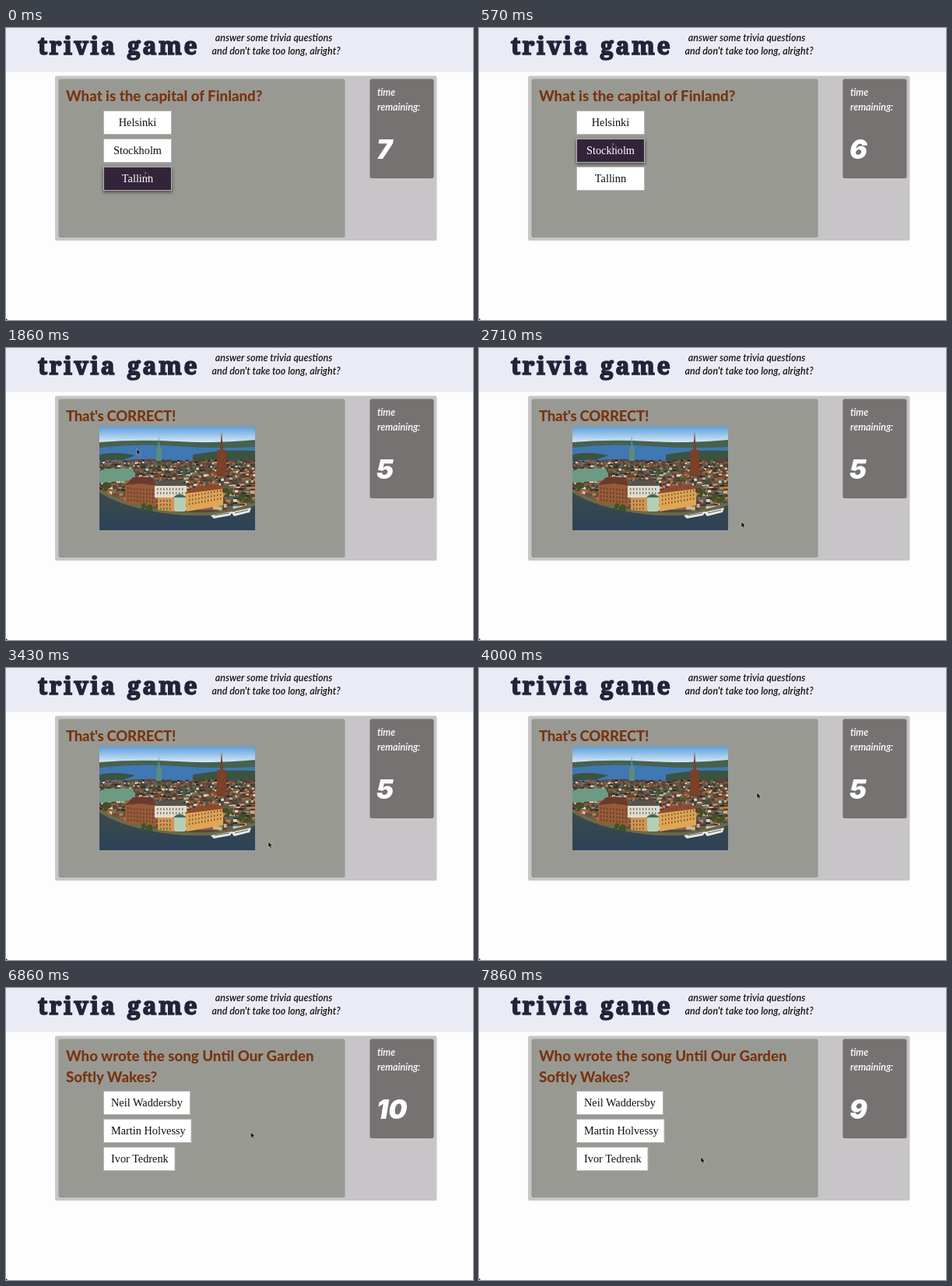
Write an HTML page that moves like this. It is 600x375 px and loops after 8000 ms.

```html
<!DOCTYPE html>
<html lang="en">
<head>
<meta charset="utf-8">
<title>trivia game</title>
<style>
html, body { margin: 0; width: 100%; height: 100%; overflow: hidden; background: #fefdfe; }
svg { display: block; width: 600px; height: 375px; }

.title { font: 900 30px "Noto Serif", serif; letter-spacing: 2.7px; fill: #23233b; stroke: #23233b; stroke-width: 1.7; }
.script { font: italic 600 12.5px Lato, sans-serif; fill: #161616; }
.side { fill: #fff; }
.question { font: 800 18.7px Lato, sans-serif; fill: #78340f; }
.answer { font: 14.3px "Liberation Serif", serif; }
.count { font: italic 900 34px Inter, sans-serif; fill: #fff; }

/* One tick of the 7 fps timeline is 1.7857% of the loop. */
.anim { animation: 8s step-end -5ms infinite; }

.option { fill: #fff; color: #111; stroke: none; }
.option rect { stroke: #b4b4b2; }
.option text { fill: currentColor; }

.ask { animation-name: ask; }
.correct { animation-name: correct; }
.next { animation-name: next; }
.first { animation-name: first; }
.second { animation-name: second; }
.third { animation-name: third; }
.ring { animation-name: ring; }
.reel { animation-name: reel; }
.cursor { animation-name: move; }

@keyframes ask { 0% { opacity: 1 } 19.643%, 100% { opacity: 0 } }
@keyframes correct { 0% { opacity: 0 } 19.643% { opacity: 1 } 82.143%, 100% { opacity: 0 } }
@keyframes next { 0% { opacity: 0 } 82.143%, 100% { opacity: 1 } }
@keyframes ring { 0% { opacity: 0 } 16.071%, 100% { opacity: 1 } }

@keyframes first {
  0% { fill: #fff; color: #111; filter: none }
  10.714%, 100% { fill: #34243a; color: #fff; filter: drop-shadow(0 2px 2px #0008) }
}
@keyframes second {
  0% { fill: #fff; color: #111; filter: none }
  3.571% { fill: #34243a; color: #fff; filter: drop-shadow(0 2px 2px #0008) }
  8.929%, 100% { fill: #fff; color: #111; filter: none }
}
@keyframes third {
  0% { fill: #34243a; color: #fff; filter: drop-shadow(0 2px 2px #0008) }
  3.571%, 100% { fill: #fff; color: #111; filter: none }
}
@keyframes reel {
  0% { transform: translateY(0) }
  3.571% { transform: translateY(-60px) }
  16.071% { transform: translateY(-120px) }
  82.143% { transform: translateY(-180px) }
  94.643%, 100% { transform: translateY(-240px) }
}
@keyframes move {
  0% { transform: translate(179px, 185px); animation-timing-function: steps(6) }
  10.714% { transform: translate(168px, 129.5px) }
  30.357% { transform: translate(168px, 129.5px); animation-timing-function: steps(2) }
  33.929% { transform: translate(337px, 223px) }
  42.857% { transform: translate(337px, 223px); animation-timing-function: steps(4) }
  50% { transform: translate(357px, 160px) }
  75% { transform: translate(341.5px, 155px); animation-timing-function: steps(7) }
  87.5% { transform: translate(310px, 190px) }
  89.286% { transform: translate(310px, 190px); animation-timing-function: steps(5) }
  98.214%, 100% { transform: translate(285px, 217px) }
}
</style>
</head>
<body>
<svg viewBox="0 0 600 375">
  <defs>
    <linearGradient id="sky" x2="0" y2="1">
      <stop stop-color="#5a9fdc"/>
      <stop offset="1" stop-color="#e2eef6"/>
    </linearGradient>
    <linearGradient id="harbour" x2="0" y2="1">
      <stop stop-color="#3d4a4a"/>
      <stop offset="1" stop-color="#2c4258"/>
    </linearGradient>
    <clipPath id="photoClip"><rect width="200" height="133"/></clipPath>
    <clipPath id="countClip"><rect x="470" y="132" width="78" height="50"/></clipPath>
  </defs>

  <rect width="600" height="375" fill="#fefdfe"/>
  <rect width="600" height="56.4" fill="#ebebf5"/>
  <rect y="373.5" width="1.5" height="1.5" fill="#222"/>
  <text class="title" x="41" y="34">trivia</text>
  <text class="title" x="156" y="34">game</text>
  <g class="script" text-anchor="middle">
    <text x="344" y="16.5">answer some trivia questions</text>
    <text x="347" y="33.5">and don't take too long, alright?</text>
  </g>

  <rect x="63" y="61.5" width="490.5" height="211.5" rx="2" fill="#c7c5c7"/>
  <rect x="68" y="66" width="367" height="202.5" rx="1.5" fill="#999994" stroke="#93938f"/>
  <rect x="468" y="66" width="81" height="126.5" rx="1.5" fill="#767272" stroke="#706c6c"/>
  <text class="script side" x="477" y="87">time</text>
  <text class="script side" x="477" y="106">remaining:</text>
  <g clip-path="url(#countClip)">
    <g class="count anim reel">
      <text x="476" y="168">7</text>
      <text x="476" y="228">6</text>
      <text x="476" y="288">5</text>
      <text x="476" y="348">10</text>
      <text x="476" y="408">9</text>
    </g>
  </g>

  <g class="anim ask">
    <text class="question" x="77" y="94">What is the capital of Finland?</text>
    <g class="answer" text-anchor="middle">
      <g class="option anim second"><rect x="125.5" y="142.5" width="87" height="30"/><text x="169" y="162">Stockholm</text></g>
      <g class="option anim third"><rect x="125.5" y="178.5" width="87" height="30"/><text x="169" y="198">Tallinn</text></g>
      <g class="option anim first"><rect x="125.5" y="106.5" width="87" height="30"/><text x="169" y="126">Helsinki</text></g>
    </g>
    <rect class="anim ring" x="125" y="106" width="88" height="31" rx="1.5" fill="none" stroke="#62a1e2" stroke-width="2"/>
  </g>

  <g class="anim correct">
    <text class="question" x="77" y="94" letter-spacing="-.3">That's CORRECT!</text>
    <g transform="translate(120 101)" clip-path="url(#photoClip)">
      <rect width="200" height="22" fill="url(#sky)"/>
      <rect y="20" width="200" height="113" fill="#3f78b4"/>
      <path d="M0 20Q50 16 100 19T200 17V26Q150 29 100 25T0 27Z" fill="#47614f"/>
      <path d="M0 36Q20 31 46 37L30 43H0ZM120 36Q160 29 200 31V46H120Z" fill="#3b5340"/>
      <path d="M0 49Q40 39 90 43T200 40V120H0Z" fill="#54463d"/>
      <g id="houses"></g>
      <path d="M0 57L8 54H42L46 60V69L0 72Z" fill="#6d9a82"/>
      <path d="M76 12L78 27H80V44H73V27H75Z" fill="#5d8a80"/>
      <path d="M157 6L159 30H163V64H151V30H155Z" fill="#7b4028"/>
      <path d="M0 82Q30 102 90 110T200 99V133H0Z" fill="url(#harbour)"/>
      <path d="M0 82Q30 102 90 110T200 99" fill="none" stroke="#6a6a48" stroke-width="4"/>
      <path d="M33 73L43 66H66L73 75V103L33 98Z" fill="#985a37"/>
      <path d="M33 75L43 65H66L73 76L54 73Z" fill="#6b3a2a"/>
      <path d="M71 76L78 70H105L112 76V91H71Z" fill="#e0dbd0"/>
      <path d="M71 76L78 69H105L112 76Z" fill="#56524e"/>
      <path d="M75 91H96V109L75 107Z" fill="#cf9650"/>
      <path d="M110 84L155 76L159 82V101L112 109Z" fill="#e0a654"/>
      <path d="M109 86L120 78L153 73L158 80Z" fill="#8b4a30"/>
      <rect x="96" y="90" width="15" height="19" rx="2" fill="#b5cfb6"/>
      <path d="M95 91Q103 82 112 91Z" fill="#466b5c"/>
      <g id="windows" fill="#3e3330" opacity=".65"></g>
      <g id="trees" fill="#3f5226"></g>
      <path d="M143 114L171 109L168 114L147 118ZM169 110L195 104L193 110L173 115Z" fill="#e9e9e6"/>
      <path d="M148 114L167 111M174 111L191 107" stroke="#56606a"/>
    </g>
  </g>

  <g class="anim next">
    <text class="question" x="77" y="94">Who wrote the song Until Our Garden</text>
    <text class="question" x="77" y="121">Softly Wakes?</text>
    <g class="answer">
      <g class="option"><rect x="125.5" y="132.5" width="111" height="30"/><text x="135" y="152">Neil Waddersby</text></g>
      <g class="option"><rect x="125.5" y="168.5" width="112.5" height="30"/><text x="135" y="188">Martin Holvessy</text></g>
      <g class="option"><rect x="125.5" y="204.5" width="91.5" height="30"/><text x="135" y="224">Ivor Tedrenk</text></g>
    </g>
  </g>

  <path class="anim cursor" d="M0 0V7.5L1.8 6L3 8.7L4.3 8.1L3.2 5.5H5.4Z" fill="#111" stroke="#fff" stroke-width=".4"/>
</svg>
<script>
let seed = 11;
const random = () => (seed = (seed * 16807) % 2147483647) / 2147483647;
const pick = list => list[Math.floor(random() * list.length)];

function add(id, tag, attrs) {
  const shape = document.createElementNS("http://www.w3.org/2000/svg", tag);
  for (const name in attrs) shape.setAttribute(name, attrs[name]);
  document.getElementById(id).append(shape);
}

// Rows of small houses, each with a dark roof above a lighter wall; nearer rows are larger.
const roofs = ["#5e3a2e", "#7d4a36", "#35403f", "#2e2a2a", "#4f6f60", "#94593c"];
const walls = ["#d0b48c", "#b98552", "#e2dacb", "#8d6249", "#49603a", "#6e5a4c"];
for (let y = 42; y < 102; y += 4) {
  const size = y / 80;
  for (let x = -4; x < 200; x += (4 + random() * 6) * size) {
    const top = y + random() * 3, width = (3 + random() * 6) * size;
    add("houses", "rect", { x, y: top, width, height: 3, fill: pick(roofs) });
    add("houses", "rect", { x, y: top + 2.5, width, height: 4 * size, fill: pick(walls) });
  }
}

function addWindows(left, top, cols, rows, slope = 0) {
  for (let i = 0; i < cols * rows; i++) {
    const col = i % cols, row = Math.floor(i / cols);
    add("windows", "rect", { x: left + col * 4, y: top + row * 5 + col * slope, width: 1.4, height: 2.6 });
  }
}
addWindows(36, 78, 9, 4, .3);
addWindows(74, 79, 9, 2);
addWindows(78, 94, 4, 3);
addWindows(115, 88, 11, 3, -.7);

// Clumps of trees on the left bank, behind the orange block and on the right bank.
for (const [x, y, spread] of [[14, 77, 14], [167, 85, 12], [188, 92, 18], [55, 104, 24]]) {
  for (let i = 0; i < 8; i++) {
    add("trees", "circle", { cx: x + (random() - .5) * spread, cy: y + (random() - .5) * 6, r: 1.5 + random() * 2 });
  }
}
</script>
</body>
</html>
```
